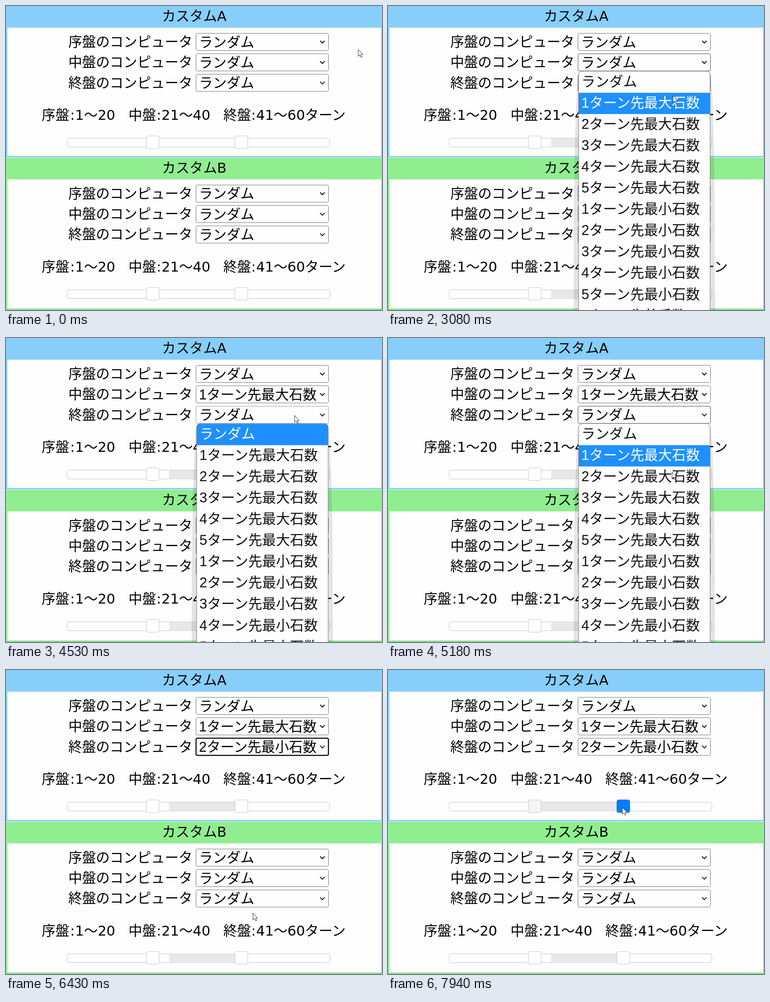
An HTML page for the animation above (8000 ms loop, 832 by 673 pixels).

```html
<!DOCTYPE html>
<html lang="ja">
<head>
<meta charset="utf-8">
<style>
html, body { margin: 0; width: 100%; height: 100%; overflow: hidden; background: #fefefe; }
svg { display: block; width: 100%; height: 100%; }
text { font: 30.5px "DejaVu Sans", "Noto Sans CJK JP", "Noto Sans CJK", sans-serif; white-space: pre; }
.field { font: 30.6px "Liberation Sans", "Noto Sans CJK JP", "Noto Sans CJK", sans-serif; }
.item { font: 30.8px "Liberation Sans", "Noto Sans CJK JP", "Noto Sans CJK", sans-serif; }
</style>
</head>
<body>
<svg id="stage" viewBox="0 0 832 673" preserveAspectRatio="none"></svg>
<script>
const LOOP = 8000, ROW = 47.1, PITCH = 45.3;
const stage = document.getElementById('stage');

function el(parent, tag, attrs, text) {
  const node = document.createElementNS('http://www.w3.org/2000/svg', tag);
  set(node, attrs);
  if (text) node.textContent = text;
  parent.appendChild(node);
  return node;
}
function set(node, attrs) {
  for (const k in attrs) node.setAttribute(k, attrs[k]);
}
const rect = (p, x, y, width, height, fill, more) =>
  el(p, 'rect', { x, y, width, height, fill, ...more });
const label = (p, x, y, str, more) => el(p, 'text', { x, y, ...more }, str);

function makeSelect(p, i) {
  const y = 60.5 + i * PITCH;
  const box = rect(p, 420.5, y, 293, 38, '#fefefe', { rx: 3 });
  const value = label(p, 427, y + 30, 'ランダム', { class: 'field' });
  el(p, 'path', { d: `M695 ${y + 16.5}l5 5l5-5`, fill: 'none', stroke: '#111', 'stroke-width': 2 });
  return { box, value };
}

function makePanel(top, name, color, height) {
  const g = el(stage, 'g', { transform: `translate(0 ${top})` });
  rect(g, 0, 0, 832, height, color);
  rect(g, 3, 48, 827, height - 51, '#fefefe');
  label(g, 345, 33, 'カスタム' + name);
  const selects = ['序', '中', '終'].map((c, i) => {
    label(g, 138, 90 + i * PITCH, c + '盤のコンピュータ');
    return makeSelect(g, i);
  });
  [[79, '序', 153, '1〜20'], [271, '中', 344, '21〜40'], [481, '終', 553.5, '41〜60ターン']]
    .forEach(([x, c, nx, turns]) => {
      label(g, x, 252, c + '盤');
      label(g, nx - 11, 252, ':');
      label(g, nx, 252, turns);
    });
  const edge = { rx: 4, stroke: '#c5c5c5' };
  rect(g, 135.5, 292.5, 581, 19.5, '#fefefe', edge);
  const range = rect(g, 361, 293, 145, 18.5, '#e8e8e8');
  const knobs = [310.5, 506.5].map(x => rect(g, x, 287.5, 28.5, 28, '#fefefe', edge));
  return { selects, range, knobs };
}

const panelA = makePanel(0, 'A', '#87cefa', 335);
const panelB = makePanel(335.8, 'B', '#90ee90', 336.7);
rect(stage, 0, 672, 832, 1, '#a5b8a5');

// Drop-down list, drawn from its first row at y = 0
const names = ['ランダム'];
for (const kind of ['大', '小'])
  for (let n = 1; n <= 5; n++) names.push(`${n}ターン先最${kind}石数`);
names.push('1ターン先着手数');

const menu = el(stage, 'g', {});
const shade = { fill: '#000', 'fill-opacity': 0.1 };
el(menu, 'path', { d: 'M422 4L419 15L414 140L411 330V540H422Z', ...shade });
el(menu, 'path', { d: 'M712 2L715 10L718 60L722 220L724 540H712Z', ...shade });
const frame = { x: 421.8, y: -0.8, width: 291, height: 600, rx: 8 };
el(el(menu, 'clipPath', { id: 'clip' }), 'rect', frame);
el(menu, 'rect', { ...frame, fill: '#fdfdfd' });
const rows = el(menu, 'g', { 'clip-path': 'url(#clip)' });
const bar = rect(rows, 421, 0, 293, ROW, '#1e90ff');
const items = names.map((s, i) => label(rows, 428, i * ROW + 32.5, s, { class: 'item' }));
el(menu, 'rect', { ...frame, fill: 'none', stroke: '#777' });

const cursor = el(stage, 'path', {
  d: 'M.5 .5V15.5L4 12.2L6.4 17.6L8.8 16.6L6.5 11.3H11Z',
  fill: '#fff', stroke: '#2b2b33', 'stroke-linejoin': 'round'
});

// The screen updates in hard steps: [time, ...values]
const moves = [
  [0, 779, 96], [660, 777, 96], [930, 748, 101], [1060, 705, 109], [1180, 669, 118],
  [1320, 663, 118], [2680, 651, 145], [2820, 643, 168], [2950, 634, 190], [3080, 630, 198],
  [3990, 632, 197], [4130, 638, 171], [5180, 628, 296], [5320, 583, 439], [5470, 559, 505],
  [5600, 549, 530], [5730, 546, 538], [7000, 546, 535], [7140, 541, 435], [7280, 531, 354],
  [7420, 522, 314], [7550, 518, 304]
];
const picks = [[0, 0], [2950, 1], [4530, 0], [5180, 1], [5320, 4], [5470, 6], [5600, 7]];
const opens = [[0, -1], [1870, 1], [3620, -1], [4530, 2], [6430, -1]];
const focus = [[0, -1], [3620, 1], [4530, -1], [6430, 2], [7940, -1]];
const at = (steps, t) => steps.filter(s => s[0] <= t).pop().slice(1);

function render(t) {
  const [x, y] = at(moves, t), [pick] = at(picks, t);
  const [open] = at(opens, t), [focused] = at(focus, t);
  set(cursor, { transform: `translate(${x} ${y})` });

  panelA.selects.forEach(({ box, value }, i) => {
    const pale = i === 1 && t >= 1060 && t < 2020 || i === 2 && t >= 4130 && t < 4650;
    set(box, {
      stroke: i === focused ? '#101010' : pale ? '#999' : i === open ? '#444' : '#707070',
      'stroke-width': i === focused ? 2.5 : 1
    });
    value.textContent = i === 1 && t >= 3620 ? names[1] : i === 2 && t >= 6430 ? names[7] : names[0];
  });
  panelB.selects.forEach(s => set(s.box, { stroke: '#707070' }));

  menu.style.display = open < 0 ? 'none' : '';
  set(menu, { transform: `translate(0 ${open === 2 ? 190.2 : 145})` });
  set(bar, { y: pick * ROW });
  items.forEach((item, i) => set(item, { fill: i === pick ? '#fff' : '#111' }));

  const hover = t >= 7420, pressed = t >= 7940;
  for (const p of [panelA, panelB]) p.range.style.display = t < 1870 ? 'none' : '';
  const from = hover ? 339 : 361;
  set(panelA.range, { x: from, width: 506 - from });
  set(panelA.knobs[0], { fill: hover ? '#f4f4f4' : '#fefefe' });
  set(panelA.knobs[1], {
    fill: pressed ? '#007fff' : t >= 7550 ? '#ededed' : hover ? '#f4f4f4' : '#fefefe',
    stroke: pressed ? '#0a5fe0' : '#c5c5c5'
  });
}

function tick() {
  render(performance.now() % LOOP);
  requestAnimationFrame(tick);
}
tick();
</script>
</body>
</html>
```
